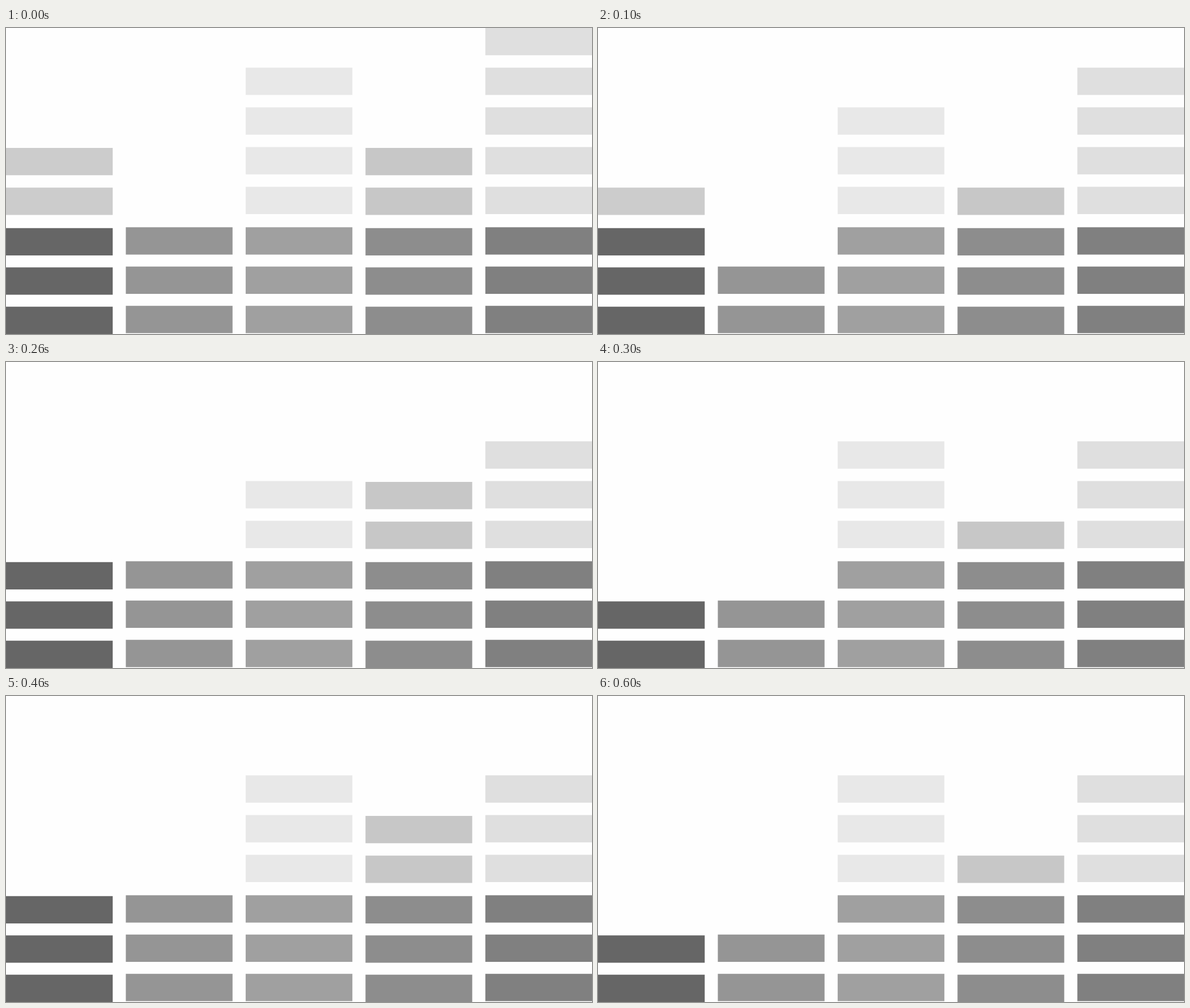
An HTML page with a canvas for the animation above (700 ms loop, 1034 by 541 pixels).

```html
<!DOCTYPE html>
<html lang="en">
<head>
<meta charset="utf-8">
<title>Equalizer</title>
<style>
  html, body { margin: 0; width: 100%; height: 100%; overflow: hidden; background: #fefefe; }
  canvas { display: block; }
</style>
</head>
<body>
<canvas id="stage" width="1034" height="541"></canvas>
<script>
const ctx = document.getElementById('stage').getContext('2d');
const STEP = 100, COLUMN_PITCH = 211.45, BLOCK_W = 188.3, BLOCK_H = 48.3;

// Number of lit blocks at each step, lower and upper colours, vertical offset
const columns = [
  { levels: [5, 4, 3, 2, 3, 4, 2], dark: '#666666', light: '#cccccc', dy: 1.5 },
  { levels: [3, 2, 3, 2, 3, 2, 2], dark: '#959595', light: '#959595', dy: 0 },
  { levels: [7, 6, 5, 6, 6, 6, 6], dark: '#a0a0a0', light: '#e8e8e8', dy: 0 },
  { levels: [5, 4, 5, 4, 5, 4, 4], dark: '#8d8d8d', light: '#c7c7c7', dy: 1.5 },
  { levels: [8, 7, 6, 6, 6, 7, 6], dark: '#808080', light: '#dfdfdf', dy: 0 },
];

// The three lower rows sit slightly closer together than the upper ones
const rowTop = row => row < 3 ? 491.2 - 69.45 * row : 280.7 - 70.2 * (row - 3);

function draw(now) {
  const step = Math.floor(now / STEP) % 7;
  ctx.fillStyle = '#fefefe';
  ctx.fillRect(0, 0, 1034, 541);
  columns.forEach(({ levels, dark, light, dy }, i) => {
    for (let row = 0; row < levels[step]; row++) {
      ctx.fillStyle = row < 3 ? dark : light;
      ctx.fillRect(i * COLUMN_PITCH, rowTop(row) + dy, BLOCK_W, BLOCK_H);
    }
  });
}

let start;
function tick(now) {
  start ??= now;
  draw(now - start);
  requestAnimationFrame(tick);
}
draw(0);
requestAnimationFrame(tick);
</script>
</body>
</html>
```
